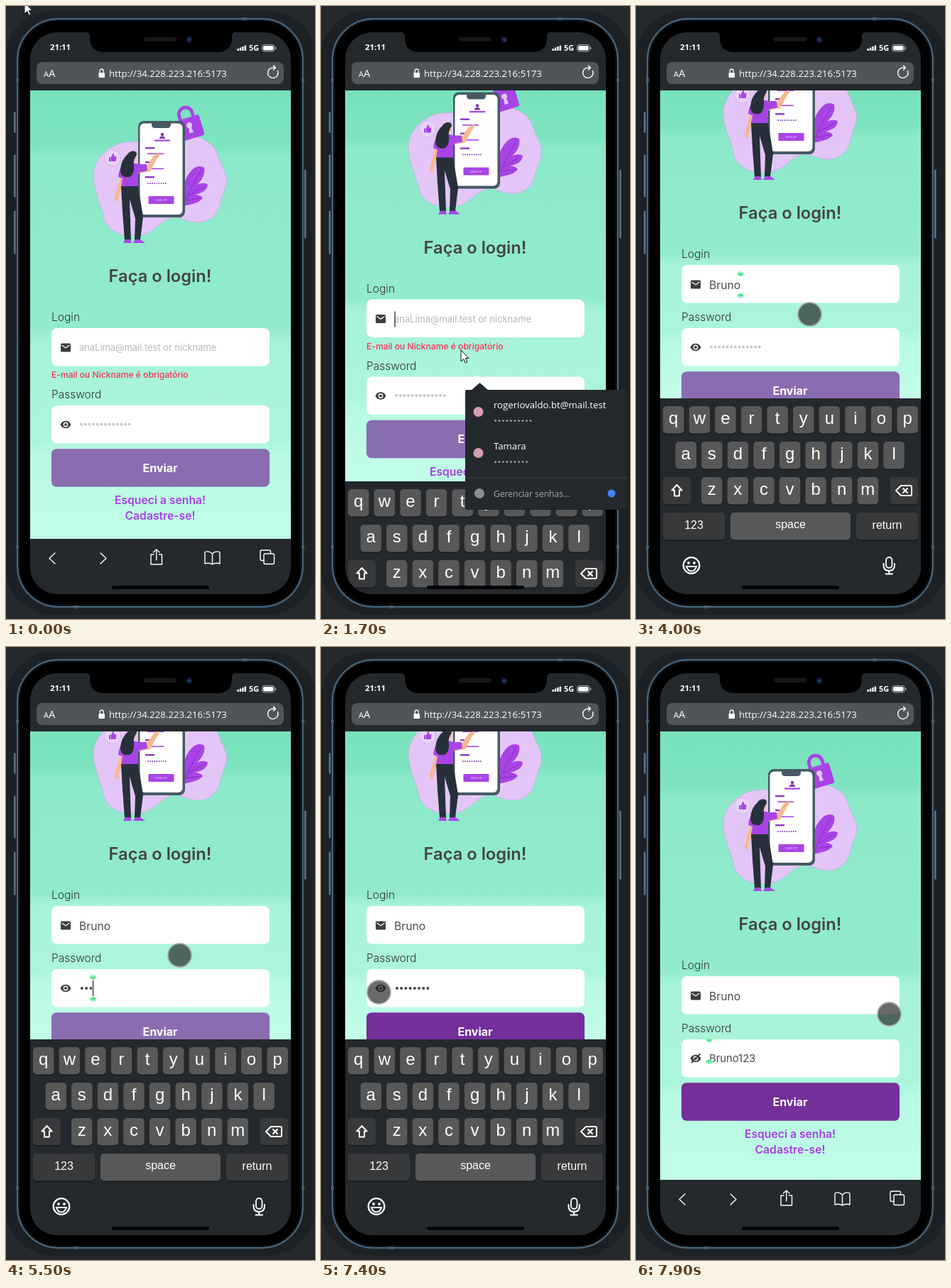
Recreate the animation shown at these times as an HTML page. Size 435x864 px, loop 8000 ms.

```html
<!DOCTYPE html>
<html lang="pt-BR">
<head>
<meta charset="utf-8">
<title>Login</title>
<style>
html, body { margin: 0; width: 100%; height: 100%; overflow: hidden; background: #24292e; }
svg { display: block; }
text { white-space: pre; }
.ui { font-family: Inter, sans-serif; }
.sys { font-family: "Open Sans", sans-serif; fill: #fff; }
.key { font-family: "Liberation Sans", Arial, sans-serif; fill: #fff; text-anchor: middle; }
.mid { text-anchor: middle; }
.line { fill: none; stroke: #fff; stroke-width: 1.4; stroke-linecap: round; stroke-linejoin: round; }
.bold { stroke-width: 2; }
.label { font-size: 15.5px; font-weight: 300; fill: #333; }
.link { font-size: 15.7px; font-weight: 600; fill: #a63fe4; text-anchor: middle; }
</style>
</head>
<body>
<svg id="stage" width="435" height="864" viewBox="0 0 435 864"></svg>
<script>
const LOOP = 8000, STEP = 100;
const BOTTOM = 751, TOP = 119, KEYS_TOP = 553, KEYS_H = 276;
const NAME = 'Bruno', SECRET = 'Bruno123';

// markup helpers
const rect = (x, y, w, h, r, fill, extra = '') =>
  `<rect x="${x}" y="${y}" width="${w}" height="${h}" rx="${r}" fill="${fill}" ${extra}/>`;
const path = (d, fill, extra = '') => `<path d="${d}" fill="${fill}" ${extra}/>`;
const line = (d, cls = '') => `<path class="line ${cls}" d="${d}"/>`;
const circle = (x, y, r, fill, extra = '') => `<circle cx="${x}" cy="${y}" r="${r}" fill="${fill}" ${extra}/>`;
const text = (cls, x, y, size, str, extra = '') =>
  `<text class="${cls}" x="${x}" y="${y}" font-size="${size}" ${extra}>${str}</text>`;
const dots = (n, x, y, gap, r, fill) =>
  Array.from({ length: n }, (_, i) => circle(x + i * gap, y, r, fill)).join('');

const PURPLE = '#a844e6', INK = '#27303a', SKIN = '#f7b78f';

function picture() {
  return path('M123 240C124 217 140 200 162 193C188 187 214 198 236 187C258 178 286 186 295 203C301 217 304 226 309 236C314 251 306 261 302 275C299 294 288 305 268 305C253 304 248 297 234 298C214 304 209 321 188 323C164 327 143 317 138 299C136 284 124 264 123 240Z', '#e3c6f7', 'stroke="#c8a3e4" stroke-width=".6"') +
    // padlock
    `<g transform="rotate(-17 259 171)">` +
    path('M249 160V151.500a9.500 9.500 0 0 1 19 0V160', 'none', `stroke="${PURPLE}" stroke-width="4.800"`) +
    rect(242, 157, 34, 30, 3, PURPLE) + circle(259, 168, 4, '#e3c6f7') +
    path('M257.500 170h3l1.500 9h-6z', '#e3c6f7') + '</g>' +
    // plant
    path('M250 282C246 262 250 243 262 231C267 225 276 225 279 228C281 238 275 246 269 252C275 249 282 249 284 252C283 261 274 264 266 266C271 266 276 268 277 271C270 279 260 279 250 282Z', PURPLE) +
    path('M249 281C256 267 265 246 275 231M257 267L279 254M254 274L273 271', 'none', 'stroke="#7d2eb0" stroke-width=".8"') +
    // handset
    rect(186, 162, 66, 136, 8, '#455a64') + rect(188.5, 165.5, 60, 128.500, 6, '#fff') +
    path('M205 165h27v2q0 5-5 5h-17q-5 0-5-5z', '#455a64') +
    circle(220, 181, 2.2, '#7a35ad') + path('M216 187q0-3.500 4-3.500t4 3.500z', '#7a35ad') +
    rect(209, 188.500, 22, 2.2, 0, PURPLE) +
    [199, 219, 240].map(y => rect(196, y, 13, 2.400, 0, '#8d38c2')).join('') +
    rect(199, 207.500, 23, 1.600, 0, PURPLE) + rect(199, 228.500, 23, 1.600, 0, PURPLE) +
    dots(9, 200, 250, 3.100, .9, '#7a35ad') +
    rect(200.500, 268, 36, 11, 1, PURPLE) +
    text('ui mid', 218.500, 275, 4, 'SIGN UP', 'fill="#f1dcff"') +
    // bubble
    circle(150, 214, 11.500, '#e9d2f9', 'stroke="#b48bd6" stroke-width=".7" stroke-dasharray="2 1.500"') +
    path('M145 213h2.500v6h-2.500zM148 213l2.500-5q2.500 0 1.500 4h3.500l-.8 7h-6.700z', PURPLE) +
    // person
    path('M183 225L199 224L208 211L215 207L216 211L212 216L203 233L184 236Z', SKIN) +
    path('M164 233L156 258L153 269L154 275L158 275L159 265L169 244Z', SKIN) +
    path('M165 224Q175 219 187 223L198 223L199 232L186 235L186 255H162L164 243L158 241Q159 229 165 224Z', PURPLE) +
    path('M162 254H186L193 297L189 330H181L182 299L174 272L176 330H167L164 290Z', INK) +
    path('M165 334L168 329H175L177 334ZM179 334L182 329H189L196 334Z', PURPLE) +
    path('M174 206Q181 202 184 208L183 217L176 222Z', SKIN) +
    path('M171 209Q175 203 182 205Q186 208 182 213Q179 218 180 225Q181 237 174 241Q161 243 161 231Q162 217 171 209Z', INK);
}

const mail = path('M78.500 475.500h11q1.500 0 1.500 1.500v9q0 1.500-1.500 1.500h-11q-1.500 0-1.500-1.500v-9q0-1.500 1.500-1.500z', '#3d3d40') +
  path('M78.500 478l5.500 3.700l5.500-3.700', 'none', 'stroke="#fff" stroke-width="1.300"');
const eye = path('M76.500 590Q79 584.800 84 584.800T91.500 590Q89 595.200 84 595.200T76.500 590Z', '#3d3d40') +
  circle(84, 590, 3.400, '#fff') + circle(84, 590, 2, '#3d3d40');

function page() {
  return `<g clip-path="url(#view)"><rect id="back" x="34" y="${TOP}" width="367" height="632" fill="url(#mint)"/>` +
    '<g id="upper">' + picture() +
    text('ui mid', 217, 389, 23.700, 'Faça o login!', 'font-weight="600" fill="#434347"') +
    '<text class="ui label" x="64" y="444">Login</text>' +
    rect(64, 454, 307, 53.500, 8, '#fff') + mail +
    text('ui', 103, 486, 12.900, 'anaLima@mail.test or nickname', 'id="hint" fill="#b4b8bd"') +
    text('ui', 103, 487.500, 15.700, '', 'id="name" fill="#4a4a4d"') + '</g>' +
    '<g id="error">' + text('ui', 64, 524, 12.100, '', 'id="message" font-weight="500" fill="#fa2f55"') + '</g>' +
    '<g id="lower"><text class="ui label" x="64" y="553">Password</text>' +
    rect(64, 563, 307, 53.500, 8, '#fff') + eye +
    path('M78 596L90.500 583.500', 'none', 'id="slash" stroke="#3d3d40" stroke-width="1.800"') +
    `<g id="mask">${dots(13, 106, 589.500, 5.650, 1.900, '#c6c6c8')}</g><g id="typed"></g>` +
    text('ui', 103, 595, 14.800, SECRET, 'id="plain" fill="#4a4a4d"') +
    rect(64, 624.300, 307, 53.500, 7, '#8a6cb0', 'id="send"') +
    text('ui mid', 217, 656.500, 16, 'Enviar', 'font-weight="700" fill="#fff"') +
    '<text class="ui link" x="217" y="702">Esqueci a senha!</text><text class="ui link" x="217" y="724">Cadastre-se!</text></g>' +
    '<g id="marks"><rect id="caret" x="-.7" y="-11" width="1.400" height="22" fill="#3a3a3a"/><g id="grips">' +
    [-1, 1].map(s => `<g transform="scale(1 ${s})"><ellipse cy="15.600" rx="5" ry="3.400" fill="#9df5c4"/>` +
      path('M-4 15L0 12.200L4 15Q0 17.500-4 15Z', '#4fe08d') + '</g>').join('') +
    '</g></g></g>';
}

function keyboard() {
  const cap = (x, y, w, label, fill = '#585859', size = 24, base = 24.500) =>
    rect(x, y + 1.500, w, 38.500, 5, '#15181b') + rect(x, y, w, 38.500, 5, fill) +
    text('key', x + w / 2, y + base, size, label);
  const row = (keys, x, y) => [...keys].map((k, i) => cap(x + i * 36.600, y, 29.500, k)).join('');
  return `<g id="keys">` + rect(34, KEYS_TOP, 367, KEYS_H + 4, 0, '#24292e') +
    row('qwertyuiop', 38, 564) + row('asdfghjkl', 55.500, 614) + row('zxcvbnm', 92, 664) +
    cap(38, 664, 39, '', '#38393b') + cap(357.500, 664, 39.500, '', '#38393b') +
    line('M57.500 675L64.500 682.500H61V690.500H54V682.500H50.500Z', 'bold') +
    line('M373 676H386Q388 676 388 678V688Q388 690 386 690H373L366 683ZM376 680L382 686M382 680L376 686', 'bold') +
    cap(38, 714, 87, '123', '#38393b', 16, 23) + cap(133, 714, 169, 'space', '#585859', 16, 21.500) +
    cap(310, 714, 87, 'return', '#38393b', 16, 23) +
    circle(78, 788.500, 11.300, 'none', 'stroke="#fff" stroke-width="2.300"') +
    circle(74, 785, 1.900, '#fff') + circle(82, 785, 1.900, '#fff') +
    path('M71 790H85Q83 796.500 78 796.500T71 790Z', 'none', 'stroke="#fff" stroke-width="2"') +
    rect(352, 777, 8.500, 15, 4.200, 'none', 'stroke="#fff" stroke-width="1.800"') +
    line('M348.500 786V788Q348.500 796 356.200 796T364 788V786M356.200 796V800M351.500 800.500H361', 'bold') + '</g>';
}

function chrome() {
  return rect(34, 37, 367, 82, 0, '#24292e') +
    text('sys', 62, 62, 11.300, '21:11', 'font-weight="700"') +
    [3, 4.500, 6, 7.500].map((h, i) => rect(325.500 + i * 3.400, 63 - h, 2.400, h, .6, '#fff')).join('') +
    text('sys', 342, 63, 11, '5G', 'font-weight="700"') +
    rect(360.500, 54.500, 17.500, 9.500, 3, 'none', 'stroke="#aaa"') + rect(362, 56, 14.500, 6.500, 1.800, '#fff') +
    rect(379, 57.500, 1.300, 3.500, .6, '#aaa') +
    rect(43, 79, 348, 31, 8, '#515458') +
    text('sys', 53, 100, 11, 'A') + text('sys', 60, 100, 14.500, 'A') +
    rect(130.500, 94, 8.500, 7, 1, '#fff') + path('M132.200 94V91.500a2.500 2.500 0 0 1 5 0V94', 'none', 'stroke="#fff" stroke-width="1.300"') +
    text('sys', 145, 100, 13.200, 'http://34.228.223.216:5173') +
    line('M382.500 91.500A7.200 7.200 0 1 1 376 87H379M376.500 84L379.500 87L376.500 90');
}

const toolbar = rect(34, BOTTOM, 367, 80, 0, '#24292e') +
  line('M69 771L61 778.500L69 786M133 771L141 778.500L133 786') +
  line('M208 773H204V787H219.500V773H215.500M211.700 781V766M207.500 770L211.700 766L216 770') +
  line('M290.500 772Q285 767 280 770V786Q286 784 290.500 787Q295 784 301 786V770Q296 767 290.500 772V787') +
  line('M363 781.500H360Q358 781.500 358 779.500V769Q358 767 360 767H370.500Q372.500 767 372.500 769V771.500') +
  rect(363, 772, 14.500, 14.500, 2, 'none', 'stroke="#fff" stroke-width="1.400"');

function body() {
  const side = (x, y, h) => rect(x, y, 3, h, 1.500, '#3b5365') + rect(x + .5, y + 1, 1, h - 2, .5, '#7592a5');
  return rect(0, 0, 435, 864, 0, '#24292e') + rect(-2, 6, 439, 852, 70, '#1c2125') +
    side(11, 149, 30) + side(11, 209, 61) + side(11, 288, 62) + side(420, 230, 98) +
    rect(16, 18, 402, 829, 57.500, '#0b0e11', 'stroke="#3d586c" stroke-width="2.400"') +
    rect(16.500, 18.500, 401, 828, 57, 'none', 'stroke="#58778b" stroke-width=".8"') +
    rect(20, 22, 394, 821, 53, '#000') +
    [[333, 16, 6, 4], [96, 845, 6, 4], [14, 102, 4, 5], [416, 102, 4, 5], [14, 760, 4, 5], [416, 760, 4, 5]]
      .map(([x, y, w, h]) => rect(x, y, w, h, 0, '#4b5c68')).join('');
}

const notch = path('M112 36.500Q118 37 118 43V46Q119 65 138 65H298Q317 65 318 46V43Q318 37 324 36.500Z', '#000') +
  rect(194, 44, 46, 6, 3, '#17181b') + circle(258, 47.500, 5, '#0c1226') + circle(258, 47.500, 2.500, '#22356f');

function popup() {
  const row = (y, label, n) => circle(221.500, y + 10, 7, '#d59cb4') +
    text('sys', 243, y + 4.500, 13.200, label) + dots(n, 245.500, y + 22.500, 5.500, 1.500, '#9a9da1');
  return '<g id="popup">' + rect(203, 541, 228, 169, 3, '#1b1f23') +
    path('M211 542L223.500 531L236 542Z', '#24292e') + rect(203, 541, 228, 168, 3, '#24292e') +
    row(562, 'rogeriovaldo.bt@mail.test', 10) + row(620, 'Tamara', 9) +
    rect(203, 664.500, 228, 1, 0, '#44484c') + circle(223, 687, 7, '#8a8d91') +
    text('sys', 243, 692, 12.100, 'Gerenciar senhas...', 'style="fill:#a4a7ab"') +
    circle(409, 687, 5.500, '#4285f4') + '</g>';
}

const pointer = '<g id="pointer">' +
  circle(0, 0, 16.500, '#1e1e1e', 'id="touch" fill-opacity=".66" stroke="#a8a8a8" stroke-opacity=".85" stroke-width="2"') +
  path('M0 0V16L3.700 12.500L6.300 18L8.800 17L6.300 11.500H11Z', '#fff', 'id="arrow" stroke="#111" stroke-width="1"') + '</g>';

// the page background falls in four soft bands
const mint = [[0, '#78e2bc'], [.12, '#7ee4c0'], [.15, '#8ce9c9'], [.53, '#92ebcd'],
  [.565, '#a6f3d8'], [.78, '#abf5dc'], [.82, '#b8fae3'], [1, '#c2fde8']]
  .map(([at, color]) => `<stop offset="${at}" stop-color="${color}"/>`).join('');

const stage = document.getElementById('stage');
stage.innerHTML = `<defs>
  <linearGradient id="mint" x1="0" y1="0" x2="0" y2="1">${mint}</linearGradient>
  <clipPath id="view"><rect id="window" x="34" y="${TOP}" width="367" height="632"/></clipPath>
  <clipPath id="screen"><rect x="34" y="37" width="367" height="792" rx="38"/></clipPath></defs>` +
  body() + `<g clip-path="url(#screen)">${page()}${chrome()}${toolbar}${keyboard()}` +
  rect(149, 817, 137, 5, 2.500, '#000') + '</g>' + notch + popup() + pointer;

const el = {};
stage.querySelectorAll('[id]').forEach(n => el[n.id] = n);
const show = (node, on) => node.setAttribute('visibility', on ? 'visible' : 'hidden');
const move = (node, x, y) => node.setAttribute('transform', `translate(${x} ${y})`);

// tables of [time, value...]
const drop = [[1500, 276], [1600, 205], [1700, 117], [1800, 40], [1900, 0], [7400, 0], [7800, 276]];
const route = [[0, 26, -5], [200, 70, 150], [400, 170, 380], [600, 236, 525], [800, 196, 494], [900, 196, 494],
  [1000, 196, 480], [1200, 196, 480], [1400, 197, 485], [2000, 197, 485], [2200, 244.5, 434.5],
  [6600, 244.5, 434.5], [7000, 81.5, 486.5], [7600, 81.5, 486.5], [7900, 356.5, 517.5]];
const letters = [[0, 0], [2700, 1], [2900, 2], [3200, 3], [3400, 4], [3500, 5]];
const bullets = [[0, 0], [5100, 1], [5300, 2], [5500, 3], [5700, 4], [5800, 5], [6200, 6], [6500, 7], [6600, 8]];
const blink = [[0, 0], [1400, 1], [2100, 0], [2700, 1], [4000, 0], [4100, 1], [4600, 0], [5000, 1], [6300, 0], [6500, 1], [6700, 0]];

const held = (table, t) => table.filter(r => r[0] <= t).pop()[1];
function glide(table, t) {
  const i = table.findIndex(r => r[0] > t);
  if (i < 0) return table[table.length - 1].slice(1);
  if (i === 0) return table[0].slice(1);
  const [a, b] = [table[i - 1], table[i]], k = (t - a[0]) / (b[0] - a[0]);
  return a.slice(1).map((v, j) => v + (b[j + 1] - v) * k);
}

function draw(t) {
  const [off] = glide(drop, t);
  const height = Math.min(BOTTOM, KEYS_TOP + off) - TOP;
  const shift = (height - 632) / 2;
  const n = held(letters, t), m = held(bullets, t);
  const gap = n < 3 ? 0 : 10;
  const revealed = t >= 7500, onPassword = t >= 4100;

  move(el.keys, 0, off);
  el.back.setAttribute('height', height);
  el.window.setAttribute('height', height);
  move(el.upper, 0, shift + gap);
  move(el.error, 0, shift);
  move(el.lower, 0, shift - gap);

  show(el.hint, !n);
  el.name.textContent = NAME.slice(0, n);
  el.message.textContent = gap ? '' : n ? 'Mínimo de caracteres aceitável é 3' : 'E-mail ou Nickname é obrigatório';
  show(el.mask, !m);
  el.typed.innerHTML = revealed ? '' : dots(m, 107, 590, 6.2, 2, '#444');
  show(el.plain, revealed);
  show(el.slash, revealed);
  el.send.setAttribute('fill', m > 7 ? '#742f9b' : '#8a6cb0');

  const stale = t >= 7600;
  const x = stale ? 103 : onPassword ? 104 + 6.2 * m : n ? 103 + el.name.getComputedTextLength() : 104;
  const y = onPassword ? 590 + shift - gap - (stale ? 11 : 0) : 482 + shift + gap;
  move(el.marks, x, y);
  show(el.caret, held(blink, t));
  show(el.grips, t >= 3000 && t < 6700 || stale);

  show(el.popup, t >= 1600 && t < 2800);
  const arrow = t < 200 || t >= 1600 && t < 2900;
  show(el.arrow, arrow);
  show(el.touch, !arrow);
  move(el.pointer, ...glide(route, t));
}

const start = performance.now();
let last = -1;
function tick() {
  const t = Math.floor((performance.now() - start) % LOOP / STEP) * STEP;
  if (t !== last) draw(last = t);
  requestAnimationFrame(tick);
}
tick();
</script>
</body>
</html>
```
